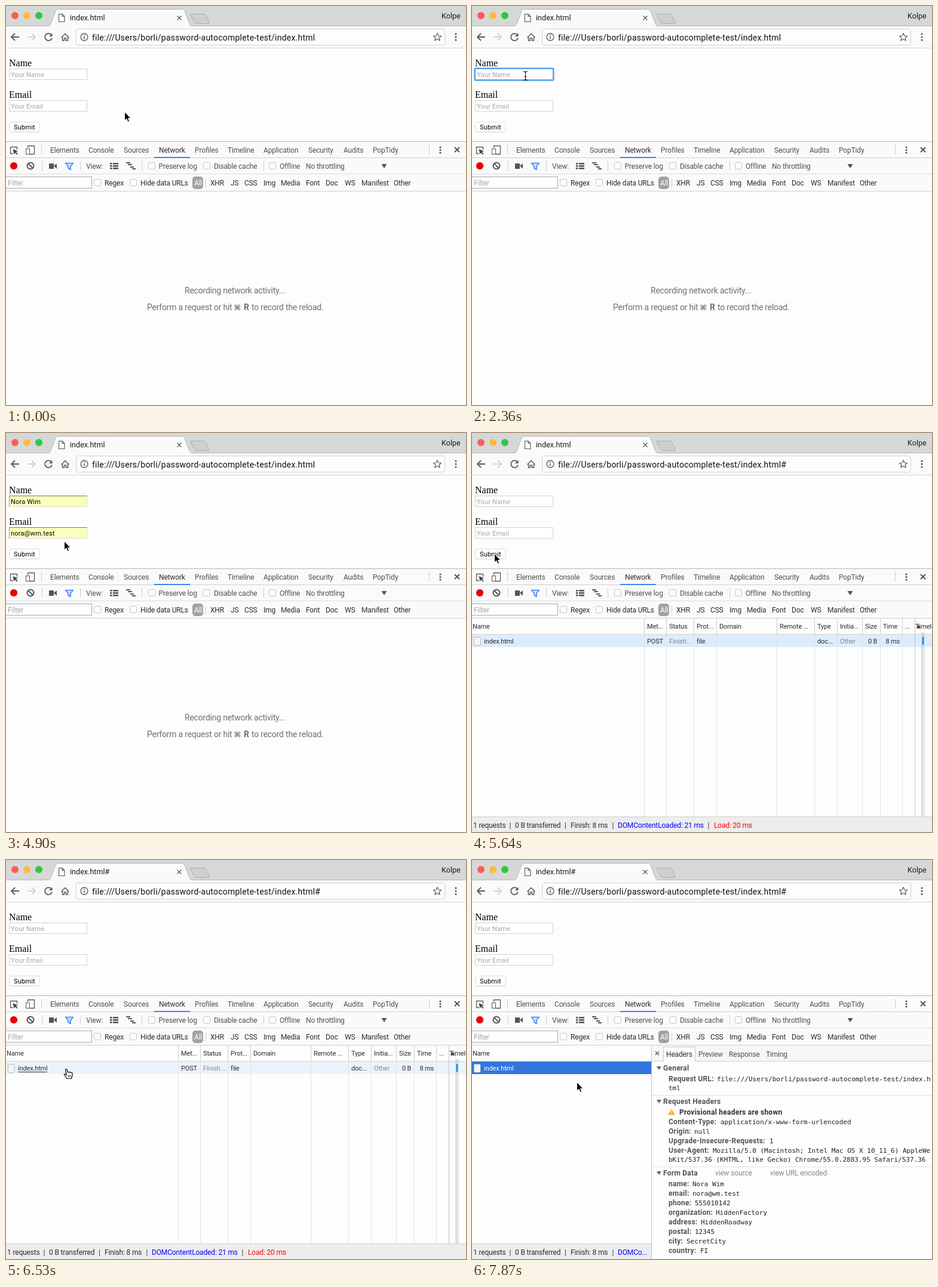
Write an HTML page that moves like this. It is 770 by 669 pixels and loops after 8000 ms.

```html
<!DOCTYPE html>
<html lang="en">
<head>
<meta charset="utf-8">
<title>Form autofill demo</title>
<style>
  html, body { margin: 0; width: 100%; height: 100%; overflow: hidden; background: #fdfdfd; }
  svg { display: block; }
  text { font: 12px Roboto, Arial, sans-serif; letter-spacing: -.16px; fill: #2c2c2c; white-space: pre; }
  .tab { fill: #505050; }
  .title { font-size: 12.5px; letter-spacing: .05px; fill: #1a1a1a; }
  .url { font-size: 14px; letter-spacing: .22px; fill: #111; }
  .serif { font: 16px "Liberation Serif", Times, serif; letter-spacing: 0; fill: #000; }
  .field { font-size: 11px; letter-spacing: .2px; fill: #000; }
  .hint { fill: #a4a4a4; }
  .grid { font-size: 11px; letter-spacing: -.15px; }
  .tip { font-size: 11px; letter-spacing: -.25px; }
  .note { font-size: 14px; letter-spacing: -.22px; fill: #707070; }
  .command { font: 700 12.5px "DejaVu Sans", sans-serif; }
  .key { font-weight: 700; letter-spacing: .25px; fill: #545454; }
  .strong { font-weight: 700; }
  .dark { fill: #333; }
  .mono { font: 11px "DejaVu Sans Mono", monospace; letter-spacing: 0; fill: #222; }
  .dim { fill: #888; }
  .blue { fill: #00f; }
  .red { fill: #f00; }
  .white { fill: #fff; }
</style>
</head>
<body>
<svg id="stage" width="770" height="669" viewBox="0 0 770 669"></svg>
<script>
const LOOP = 8000;
const PAGE = 'file:///Users/borli/password-autocomplete-test/index.html';
const PERSON = 'Nora Wim', MAIL = 'nora@wm.test';

// Moments at which the interface changes
const FOCUS = 2360, POPUP = 2510, PREVIEW = 3260, ACCEPT = 3560, BLUR = 4600;
const PRESS = 5340, SENT = 5490, RETITLE = 5930, HOVER = 6380, TIP = 6970, CLICK = 7270, DETAILS = 7420;

// Pointer steps: time, x, y, shape
const POINTER = [
  [0, 198, 177, 'arrow'], [1330, 188, 171, 'arrow'], [1480, 162, 153, 'arrow'], [1630, 124, 131, 'ibeam'],
  [1770, 97, 120, 'ibeam'], [1920, 89, 117, 'ibeam'], [4160, 110, 126, 'ibeam'], [4310, 150, 145, 'arrow'],
  [4460, 180, 162, 'arrow'], [4600, 184, 170, 'arrow'], [4750, 157, 179, 'arrow'], [4900, 97, 181, 'arrow'],
  [5050, 54, 196, 'arrow'], [5200, 37, 202, 'arrow'], [6080, 46, 224, 'arrow'], [6230, 74, 278, 'arrow'],
  [6380, 95, 330, 'arrow'], [6530, 101, 350, 'hand'], [6680, 102, 354, 'hand'], [7870, 175, 372, 'arrow']
];

const text = (x, y, s, cls = '') => `<text x="${x}" y="${y}" class="${cls}">${s}</text>`;
const row = (y, cls, items) => items.map(([x, s, extra = '']) => text(x, y, s, cls + ' ' + extra)).join('');
const rect = (x, y, w, h, fill, stroke = 'none', r = 0, width = 1) =>
  `<rect x="${x}" y="${y}" width="${w}" height="${h}" rx="${r}" fill="${fill}" stroke="${stroke}" stroke-width="${width}"/>`;
const path = (d, stroke, w = 1, fill = 'none') =>
  `<path d="${d}" stroke="${stroke}" stroke-width="${w}" fill="${fill}" stroke-linejoin="round"/>`;
const shape = (d, fill) => path(d, 'none', 0, fill);
const dot = (x, y, r, fill, stroke = 'none', w = 1) =>
  `<circle cx="${x}" cy="${y}" r="${r}" fill="${fill}" stroke="${stroke}" stroke-width="${w}"/>`;
const cross = (x, y, r, color, w) => path(`M${x - r} ${y - r}l${2 * r} ${2 * r}m0 ${-2 * r}l${-2 * r} ${2 * r}`, color, w);
const hline = (y, color, x = 0, w = 770) => rect(x, y, w, 1, color);
const vline = (x, y, h, color = '#ccc') => rect(x, y, 1, h, color);
const during = (spans, content) => `<g data-on="${spans}">${content}</g>`;
const check = (x, y) => rect(x + .5, y + .5, 11, 11, '#fdfdfd', '#c4c4c4', 2);
const dots = (x, ys, r) => ys.map(y => dot(x, y, r, '#555')).join('');

function browserBar() {
  return rect(0, 0, 770, 34, '#d6d8d7') + hline(33, '#b4b5b4')
    + path('M69 34C74 34 75 30 76 27L82 11C84 6.5 85 5.5 89 5.5H293C297 5.5 298 6.5 300 11L306 27C307 30 308 34 313 34', '#b4b5b4', 1, '#fafafa')
    + rect(0, 34, 770, 36, '#fafafa') + hline(70, '#d4d4d4')
    + dot(15, 16, 6, '#fc5b57') + dot(35, 16, 6, '#fdbb3f') + dot(55, 16, 6, '#2fc840')
    + path('M310 13.5H331Q333 13.5 334 15L340 27Q341 29.5 339 29.5H319Q317 29.5 316 28L309 15Q308 13.5 310 13.5Z', '#acadac', 1, '#cecfce')
    + path('M88.5 13.5H94L98 17.5V26.5H88.5ZM94 13.5V17.5H98', '#555', 1.1, '#fff')
    + during(`0-${RETITLE}`, text(107, 24, 'index.html', 'title'))
    + during(`${RETITLE}-${LOOP}`, text(107, 24, 'index.html#', 'title'))
    + cross(290, 20, 3.5, '#555', 1.3) + text(729, 21, 'Kolpe', 'title')
    + path('M22 52H9M15 46L9 52 15 58', '#5a5a5a', 1.8)
    + path('M36 52H49M43 46L49 52 43 58', '#d2d2d2', 1.8)
    + path('M76 48.5A6 6 0 1 0 77 53.5', '#5a5a5a', 1.8) + shape('M77.5 45.5V51H72Z', '#5a5a5a')
    + path('M92.5 53L99 46.5 105.5 53M94.5 52V58H97.5V54H100.5V58H103.5V52', '#5a5a5a', 1.5)
    + rect(117.5, 38.5, 617, 27, '#fdfdfd', '#d0d0d0', 3)
    + dot(131, 52, 6, 'none', '#5a5a5a', 1.3) + rect(130.3, 51, 1.5, 4.5, '#5a5a5a') + rect(130.3, 48.3, 1.5, 1.6, '#5a5a5a')
    + during(`0-${SENT}`, text(144, 57.5, PAGE, 'url'))
    + during(`${SENT}-${LOOP}`, text(144, 57.5, PAGE + '#', 'url'))
    + path('M722 45.5L724 50 728.6 50.4 725.1 53.5 726.2 58 722 55.6 717.8 58 718.9 53.5 715.4 50.4 720 50Z', '#5a5a5a', 1.2)
    + dots(753, [47, 52, 57], 1.6);
}

function field(y, hint, value) {
  const base = y + 14;
  const inset = rect(5, y, 131, 19, '#faffbd') + hline(y + 18, '#dcdcce', 5, 131) + vline(135, y, 19, '#dcdcce')
    + vline(5, y, 19, '#9c9c90') + hline(y, '#77776c', 5, 131);
  return rect(5.5, y + .5, 130, 18, '#fff', '#d2d2d2')
    + during(`0-${PREVIEW} ${SENT}-${LOOP}`, text(8, base, hint, 'field hint'))
    + during(`${PREVIEW}-${SENT}`, inset)
    + during(`${PREVIEW}-${ACCEPT}`, text(8, base, value, 'field hint'))
    + during(`${ACCEPT}-${SENT}`, text(8, base, value, 'field'));
}

function page() {
  return text(5, 101, 'Name', 'serif') + field(105, 'Your Name', PERSON)
    + during(`${FOCUS}-${BLUR}`,
        rect(4.5, 104.5, 132, 20, 'none', '#93c3f8', 2, 3) + rect(5, 105, 131, 19, 'none', '#58a2f2', 1, 2))
    + during(`${ACCEPT}-${BLUR}`, rect(58, 109, 1, 12, '#000'))
    + text(5, 154, 'Email', 'serif') + field(158, 'Your Email', MAIL)
    + rect(5.5, 195, 51, 17, '#e4e4e4', 'none', 3.5) + rect(5.5, 194.5, 51, 16.5, '#fff', '#dcdcdc', 3.5)
    + during(`${PRESS}-${SENT}`, rect(5.5, 194.5, 51, 16.5, '#e2e2e2', '#c4c4c4', 3.5))
    + text(13, 207, 'Submit', 'field');
}

function popup() {
  return during(`${POPUP}-${ACCEPT}`,
    rect(5.5, 126.5, 173, 48, '#fff', '#c4c4c4')
    + during(`${PREVIEW}-${ACCEPT}`, rect(6, 127, 172, 23, '#dcdcdc'))
    + text(12, 143, PERSON) + text(103, 143, MAIL, 'grid dim')
    + hline(150, '#e2e2e2', 6, 172) + text(12, 167, 'Autofill settings', 'dim'));
}

function toolbars() {
  const list = [263, 267, 271].map(y => rect(174, y, 3.5, 2.6, '#555') + rect(179, y, 9, 2.6, '#555')).join('');
  const waterfall = [[201, 262, 7], [204, 265, 7], [208, 269, 6], [211, 272, 6]]
    .map(([x, y, w]) => rect(x, y, w, 2, '#555')).join('');
  return rect(0, 227, 770, 84, '#fafafa') + hline(227, '#b6b6b6') + hline(254, '#d0d0d0')
    + hline(281, '#dcdcdc') + hline(310, '#d0d0d0')
    + path('M18.5 241V236.5H7.5V247.5H12', '#5a5a5a', 1.3)
    + shape('M11.5 240L20 243.5 16.7 244.8 19.5 248 18 249.3 15.3 246 13.5 248.8Z', '#444')
    + path('M36.5 238V234.5H47.5V248.5H40', '#5a5a5a', 1.3) + rect(33.5, 239.5, 6, 9, '#fafafa', '#5a5a5a')
    + vline(59, 233, 16) + vline(708, 233, 16) + dots(727, [237, 241.5, 246], 1.6) + cross(755, 241, 4, '#555', 2)
    + row(246, 'tab', [[74, 'Elements'], [138, 'Console'], [197, 'Sources'], [316, 'Profiles'], [371, 'Timeline'],
        [431, 'Application'], [506, 'Security'], [565, 'Audits'], [614, 'PopTidy']])
    + text(256, 246, 'Network') + rect(248, 253, 60, 2, '#3e82f1')
    + dot(13, 268, 7, '#f8d4d4') + dot(13, 268, 6, '#e80000')
    + dot(41, 268, 5.5, 'none', '#555', 2) + path('M37 264L45 272', '#555', 2)
    + [60, 124, 227, 431].map(x => vline(x, 260, 16)).join('')
    + rect(72, 264, 8, 9, '#555') + shape('M80 268L85 264V273Z', '#555')
    + path('M99.5 263.5H112.5L108 268.5V274.5L104 272V268.5Z', '#4285f4', 1.6, '#d3e2fd')
    + list + waterfall + check(238, 262) + check(330, 262) + check(440, 262)
    + row(273, 'tab', [[134, 'View:'], [255.5, 'Preserve log'], [348, 'Disable cache'], [458, 'Offline'], [502, 'No throttling']])
    + shape('M628.5 265H637.5L633 272Z', '#555')
    + rect(-.5, 286.5, 144, 19, '#fff', '#a6a9ae') + text(3, 301, 'Filter', 'hint')
    + check(147, 290) + check(207, 290) + rect(312, 286, 18, 21, '#a2a2a2', 'none', 5) + vline(334, 289, 15)
    + row(301, '', [[165, 'Regex'], [225, 'Hide data URLs'], [315, 'All', 'white'], [342, 'XHR'], [376, 'JS'], [399, 'CSS'],
        [431, 'Img'], [460, 'Media'], [502, 'Font'], [535, 'Doc'], [567, 'WS'], [595, 'Manifest'], [649, 'Other']]);
}

function emptyLog() {
  return text(299, 482, 'Recording network activity...', 'note')
    + row(510, 'note', [[236, 'Perform a request or hit'], [381.5, '⌘', 'command'], [398, 'R', 'strong'], [411, 'to record the reload.']]);
}

const sheet = rect(3.5, 342.5, 10.5, 13.5, '#fff', '#b0b5ba', 1)
  + [346, 349, 352].map(y => hline(y, '#dde3e8', 5, 7)).join('');
const status = last => rect(0, 643, 770, 26, '#ededed') + hline(643, '#cfcfcf')
  + row(662, '', [[2, '1 requests'], [62.5, '|'], [72, '0 B transferred'], [155, '|'], [165, 'Finish: 8 ms'], [234.5, '|'], ...last]);

function requestLog() {
  const columns = [288, 325, 371, 409, 510, 573, 611, 653, 683, 720, 741];
  return during(`${SENT}-${HOVER}`, rect(0, 338, 770, 21, '#dcecfd'))
    + during(`${HOVER}-${DETAILS}`, rect(0, 338, 770, 21, '#ebf2fc'))
    + columns.map(x => vline(x, 311, 332, '#e2e2e2') + vline(x, 311, 26)).join('') + hline(337, '#d4d4d4')
    + row(328, 'grid', [[1, 'Name'], [293, 'Met...'], [330, 'Status'], [376, 'Prot...'], [414, 'Domain'], [515, 'Remote ...'],
        [578, 'Type'], [616, 'Initia...'], [658, 'Size'], [688, 'Time'], [725, '...'], [742, 'Timeline']])
    + shape('M744 327.5H751L747.5 321Z', '#444')
    + vline(741, 311, 332, '#c4c4c4') + vline(753, 334, 309, '#a6a6a6') + vline(756, 334, 309, '#bcbcbc')
    + rect(753.5, 342, 3, 13, '#1a9fe8') + sheet
    + row(353, 'grid', [[20, 'index.html'], [293, 'POST'], [330, 'Finish...', 'dim'], [376, 'file'], [578, 'doc...'],
        [616, 'Other', 'dim'], [663, '0 B'], [692.5, '8 ms']])
    + during(`${HOVER}-${DETAILS}`, hline(355, '#333', 20, 49))
    + status([[244, 'DOMContentLoaded: 21 ms', 'blue'], [394.5, '|'], [405, 'Load: 20 ms', 'red']])
    + during(`${TIP}-${CLICK}`, rect(112, 369, 292, 28, 'rgba(0,0,0,.08)', 'none', 3)
        + rect(113.5, 368.5, 289, 25, '#f3f3f3', '#bdbdbd', 2) + text(122, 385, PAGE, 'tip'));
}

function details() {
  const section = (y, name) => shape(`M309 ${y - 7}H317L313 ${y - 1}Z`, '#666') + text(320, y, name, 'key');
  const entry = (y, key, x, value) => text(329, y, key + ':', 'key') + text(x, y, value, 'mono');
  const form = [['name', 369, PERSON], ['email', 369, MAIL], ['phone', 373, '555010142'], ['organization', 408, 'HiddenFactory'],
    ['address', 383, 'HiddenRoadway'], ['postal', 373, '12345'], ['city', 359, 'SecretCity'], ['country', 382, 'FI']];
  return text(1, 328, 'Name', 'grid') + hline(337, '#d4d4d4')
    + rect(0, 338, 300, 21, '#3175dc') + sheet + text(20, 353, 'index.html', 'grid white')
    + status([[244, 'DOMCo...', 'blue']])
    + rect(300, 311, 470, 358, '#fdfdfd') + rect(301, 311, 469, 26, '#f6f6f6')
    + hline(337, '#d0d0d0', 301, 469) + vline(300, 311, 358, '#c4c4c4')
    + cross(310, 324, 3, '#555', 1.4) + rect(320.5, 313.5, 53, 24, '#fdfdfd', '#cacaca') + rect(321, 337, 52, 1, '#fdfdfd')
    + row(330, '', [[325, 'Headers'], [379, 'Preview', 'tab'], [430, 'Response', 'tab'], [492, 'Timing', 'tab']])
    + section(353, 'General')
    + entry(371, 'Request URL', 410, PAGE.slice(0, -3)) + text(329, 386, PAGE.slice(-3), 'mono')
    + hline(394, '#e4e4e4', 301, 469) + section(409, 'Request Headers')
    + path('M334 418L339 427H329Z', '#f2b01e', 1, '#f2b01e') + rect(333.4, 420.5, 1.3, 3.5, '#fff') + rect(333.4, 425, 1.3, 1.3, '#fff')
    + text(347, 427, 'Provisional headers are shown', 'key dark')
    + entry(443, 'Content-Type', 416, 'application/x-www-form-urlencoded')
    + entry(459, 'Origin', 372, 'null')
    + entry(475, 'Upgrade-Insecure-Requests', 498, '1')
    + entry(491, 'User-Agent', 403, 'Mozilla/5.0 (Macintosh; Intel Mac OS X 10_11_6) AppleWe')
    + text(329, 506, 'bKit/537.36 (KHTML, like Gecko) Chrome/55.0.2883.95 Safari/537.36', 'mono')
    + hline(514, '#e4e4e4', 301, 469) + section(529, 'Form Data')
    + row(529, 'dim', [[407, 'view source'], [499, 'view URL encoded']])
    + form.map(([key, x, value], i) => entry(547 + 16 * i, key, x, value)).join('');
}

const pointer = '<g id="pointer">'
  + `<g id="arrow">${path('M.5 .5V15L3.8 12 6.2 17.3 8.6 16.2 6.3 11.2H10.8Z', '#fff', 1, '#000')}</g>`
  + `<g id="ibeam">${path('M-3 -7.5Q0 -7.5 .5 -5.5Q1 -7.5 4 -7.5M.5 -6V6M-3 7.5Q0 7.5 .5 5.5Q1 7.5 4 7.5M-1.5 1.5H2.5', '#111', 1.1)}</g>`
  + `<g id="hand">${path('M-1.5 1.5Q-.5 -.5 1 1.5L2.5 6Q4 4.5 5.3 6.2Q7 5 8 6.8Q10 6 10.3 8.5L9.8 12.5 8.3 16.5H1L-3.5 10.5Q-4 8.5 -2 9L.3 10.5Z', '#000', 1.2, '#fff')}`
  + `${path('M3.2 10.5V14M5.2 10.5V14M7.2 10.5V14', '#000', .8)}</g></g>`;

const stage = document.getElementById('stage');
stage.innerHTML = rect(0, 0, 770, 669, '#fdfdfd') + browserBar() + page() + toolbars()
  + during(`0-${SENT}`, emptyLog()) + during(`${SENT}-${DETAILS}`, requestLog())
  + during(`${DETAILS}-${LOOP}`, details()) + popup() + pointer;

const timed = [...stage.querySelectorAll('[data-on]')].map(node => ({
  node, spans: node.dataset.on.split(' ').map(span => span.split('-').map(Number))
}));
const holder = document.getElementById('pointer');

function show(time) {
  for (const { node, spans } of timed)
    node.style.display = spans.some(([from, to]) => time >= from && time < to) ? '' : 'none';
  const [, x, y, look] = POINTER.findLast(step => step[0] <= time);
  holder.setAttribute('transform', `translate(${x} ${y})`);
  for (const node of holder.children) node.style.display = node.id === look ? '' : 'none';
}

function tick() {
  show(performance.now() % LOOP);
  requestAnimationFrame(tick);
}
tick();
</script>
</body>
</html>
```
